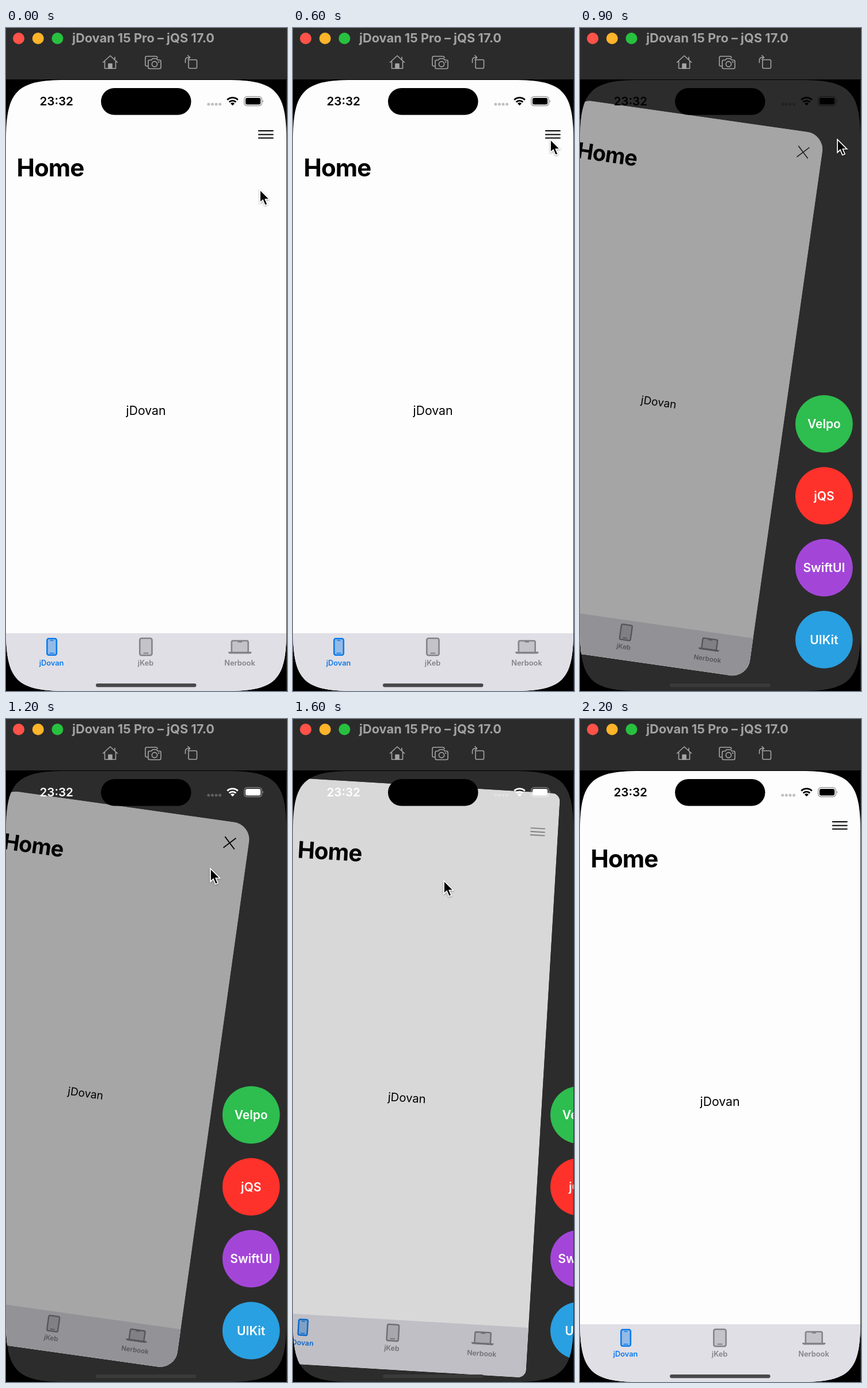
These frames come from a looping animation (488 px wide and 1148 px high, 2.3 s). An HTML page:

```html
<!DOCTYPE html>
<html lang="en">
<head>
<meta charset="utf-8">
<title>Side menu</title>
<style>
html, body { margin: 0; width: 100%; height: 100%; overflow: hidden; background: #000; }
svg { display: block; width: 488px; height: 1148px; }
text { font-family: Inter, "Liberation Sans", sans-serif; }
.mid { text-anchor: middle; }
.semi { font-weight: 600; }
#tools { fill: none; stroke: #a5a5a5; stroke-width: 1.6; stroke-linejoin: round; stroke-linecap: round; }
#cursor { filter: drop-shadow(0 1.5px 1.5px rgba(0, 0, 0, .35)); }
</style>
</head>
<body>
<svg viewBox="0 0 488 1148" xmlns="http://www.w3.org/2000/svg">
  <defs>
    <clipPath id="screen">
      <path d="M0 194C0 109 19 90 104 90H383C468 90 487 109 487 194V1044C487 1129 468 1148 383 1148H104C19 1148 0 1129 0 1044Z"/>
    </clipPath>
    <clipPath id="cardClip"><rect id="cardShape" width="488" height="1058"/></clipPath>
  </defs>
  <rect width="488" height="1148"/>

  <rect width="488" height="89" fill="#2b2b2b"/>
  <circle cx="22" cy="18" r="10" fill="#ff5249"/>
  <circle cx="55.7" cy="18" r="10" fill="#ffb429"/>
  <circle cx="89.4" cy="18" r="10" fill="#27c13f"/>
  <text x="115" y="25" font-size="21.8" font-weight="700" fill="#a2a2a2">jDovan 15 Pro – jQS 17.0</text>
  <g id="tools">
    <path d="M168.5 59.5 181 48 193.5 59.5M171.5 57.500V70H190.500V57.500M189 55V50.500"/>
    <path d="M178 70V62H184V70Z" fill="#a5a5a5"/>
    <path d="M246 66H244.500Q242 66 242 63.500V51.500Q242 49 244.500 49H260Q262.500 49 263 51.500"/>
    <path d="M249.500 55.500H252.500L254.500 53H261.500L263.500 55.500H266.500Q269 55.500 269 58V68Q269 70.500 266.500 70.500H249.500Q247 70.500 247 68V58Q247 55.500 249.500 55.500Z"/>
    <circle cx="258" cy="62.500" r="4.600"/><circle cx="265.300" cy="59" r=".5"/>
    <rect x="317" y="55" width="14.500" height="14.800" rx="2"/>
    <path d="M311.500 60V56Q311.500 51 316.500 51H319M316 47.500 319.500 51 316 54.500"/>
  </g>

  <g clip-path="url(#screen)">
    <rect y="90" width="488" height="1058" fill="#2c2c2c"/>
    <g id="card"><g clip-path="url(#cardClip)">
      <rect width="488" height="1058" fill="#fdfdfd"/>
      <g id="top">
        <text x="18.500" y="167" font-size="42" font-weight="700" letter-spacing="-.9">Home</text>
        <path id="burger" d="M438 88H464.500M438 94.500H464.500M438 100.500H464.500" stroke="#000" stroke-width="2"/>
        <path id="cross" d="M440.500 84 462 105.500M462 84 440.500 105.500" stroke="#000" stroke-width="2"/>
      </g>
      <text id="label" class="mid" x="243" y="580" font-size="21.2">jDovan</text>
      <g id="bar">
        <rect y="958" width="488" height="140" fill="#e0dfe6"/>
        <g fill="#0b7aea" stroke="#0b7aea">
          <rect x="71.300" y="967.300" width="16.500" height="28.500" rx="3" fill-opacity=".36" stroke-width="2.600"/>
          <path d="M76.500 970.500H82.500M75.500 992.500H83.500" stroke-width="1.600"/>
          <text class="mid semi" x="79" y="1014" font-size="12.800" stroke="none">jDovan</text>
        </g>
        <g fill="#838388" stroke="#838388">
          <rect x="232.300" y="966.800" width="21.200" height="29.500" rx="3" fill-opacity=".3" stroke-width="2.600"/>
          <path d="M238.500 992.500H247.500" stroke-width="1.800"/>
          <text class="mid semi" x="242.500" y="1014" font-size="12.800" stroke="none">jKeb</text>
          <rect x="391.800" y="971" width="28.800" height="20.500" rx="2.500" fill-opacity=".3" stroke-width="2.600"/>
          <path d="M402.500 973H410" stroke-width="2"/>
          <path d="M386 990H426.500Q426.500 993.500 423 993.500H389.500Q386 993.500 386 990Z" stroke="none"/>
          <text class="mid semi" x="406" y="1014" font-size="12.800" stroke="none">Nerbook</text>
        </g>
      </g>
      <rect id="shade" width="488" height="1058"/>
    </g></g>

    <g id="menu"></g>

    <rect x="165" y="104" width="156.500" height="46.500" rx="23.200"/>
    <text id="clock" class="semi" x="58.500" y="134.300" font-size="20.600">23:32</text>
    <g id="status">
      <g opacity=".24">
        <circle cx="351.800" cy="132" r="2.500"/><circle cx="358.400" cy="132" r="2.500"/>
        <circle cx="365" cy="132" r="2.500"/><circle cx="371.600" cy="132" r="2.500"/>
      </g>
      <g fill="none" stroke="currentColor" stroke-width="2.900">
        <path d="M384.300 124.400A13.200 13.200 0 0 1 402.700 124.400"/>
        <path d="M387.700 128.300A8.200 8.200 0 0 1 399.300 128.300"/>
      </g>
      <path d="M393.500 134.300 390 130.700A5 5 0 0 1 397 130.700Z"/>
      <rect x="413.700" y="118.700" width="30.600" height="16" rx="5" fill="none" stroke="currentColor" stroke-opacity=".45" stroke-width="1.300"/>
      <rect x="415.900" y="120.900" width="26.200" height="11.600" rx="3"/>
      <path d="M445.800 124.300Q448 126.700 445.800 129.200Z" opacity=".5"/>
    </g>
    <rect id="home" x="156" y="1135" width="174.500" height="6.200" rx="3.100"/>
  </g>
  <rect x="487" y="90" width="1" height="1058" fill="#30302e"/>
  <path id="cursor" d="M0 0V22.500L5 18 8.800 27 13 25.200 9.300 16.500H16.500Z" stroke="#fff" stroke-width="1.700"/>
</svg>
<script>
const LOOP = 2300, STEP = 100, OPEN = 750, CLOSE = 1550;
const el = id => document.getElementById(id);
const set = (id, attrs) => { for (const k in attrs) el(id).setAttribute(k, attrs[k]); };
const ramp = (t, start, length) => Math.min(1, Math.max(0, (t - start) / length));
const shiftY = y => `translate(0 ${y})`;

const buttons = [['Velpo', '#2ebd4f'], ['jQS', '#ff322b'], ['SwiftUI', '#a346d8'], ['UIKit', '#29a0e1']];
el('menu').innerHTML = buttons.map(([name, color], i) => `
  <g transform="translate(0 ${685.5 + i * 124.5})">
    <circle r="49.800" fill="${color}"/>
    <text class="mid semi" y="7.600" font-size="21" fill="#fff">${name}</text>
  </g>`).join('');

// Slightly underdamped spring from 0 to 1.
function spring(ms) {
  if (ms <= 0) return 0;
  const x = ms * 0.034;
  return 1 - Math.exp(-0.8 * x) * (Math.cos(0.6 * x) + Math.sin(0.6 * x) * 4 / 3);
}

// time, x, y of the pointer tip
const pointer = [
  [0, 441, 280], [100, 440, 278], [300, 440, 278], [400, 460, 238], [500, 452, 208],
  [600, 447, 193], [900, 447, 193], [1100, 400, 232], [1300, 310, 286], [1500, 286, 299],
  [1600, 262, 280], [1700, 173, 210], [1800, 70, 142], [1900, -40, 80], [LOOP, -40, 80]
];
function pointerAt(t) {
  const i = pointer.findIndex(key => key[0] > t);
  const a = pointer[i - 1], b = pointer[i];
  const f = (t - a[0]) / (b[0] - a[0]);
  return `${a[1] + (b[1] - a[1]) * f} ${a[2] + (b[2] - a[2]) * f}`;
}

function statusColor(t, opening, closing) {
  const v = Math.round(255 * (ramp(t, opening, 200) - ramp(t, closing, 200)));
  return `rgb(${v},${v},${v})`;
}

function draw(t) {
  const p = spring(t - OPEN) - spring(t - CLOSE);
  const open = t > OPEN && t < CLOSE;
  set('card', { transform: `translate(${244 - 101.4 * p} ${619 + 4.7 * p}) rotate(${8 * p}) scale(${1 - 0.1 * p}) translate(-244 -529)` });
  set('cardShape', { rx: Math.max(0, 34 * p) });
  set('shade', { opacity: Math.max(0, 0.345 * p) });
  set('top', { transform: shiftY(-54 * p) });
  set('label', { transform: shiftY(-16 * p) });
  set('bar', { transform: shiftY(22.5 * p) });
  set('cross', { opacity: open ? ramp(t, OPEN - 30, 240) : 0 });
  set('burger', { opacity: open ? 0 : t < OPEN ? 1 : ramp(t, CLOSE - 30, 200) });
  set('menu', { transform: `translate(${549.5 - 123.8 * p} 0)` });
  set('clock', { fill: statusColor(t, 930, 1660) });
  const icons = statusColor(t, 910, 1605);
  set('status', { fill: icons, color: icons });
  set('home', { fill: p > 0.3 ? '#3a3a3a' : '#49494b' });
  set('cursor', { transform: `translate(${pointerAt(t)})` });
}

const begin = performance.now();
function tick() {
  const t = (performance.now() - begin) % LOOP;
  draw(Math.floor(t / STEP) * STEP);
  requestAnimationFrame(tick);
}
tick();
</script>
</body>
</html>
```
